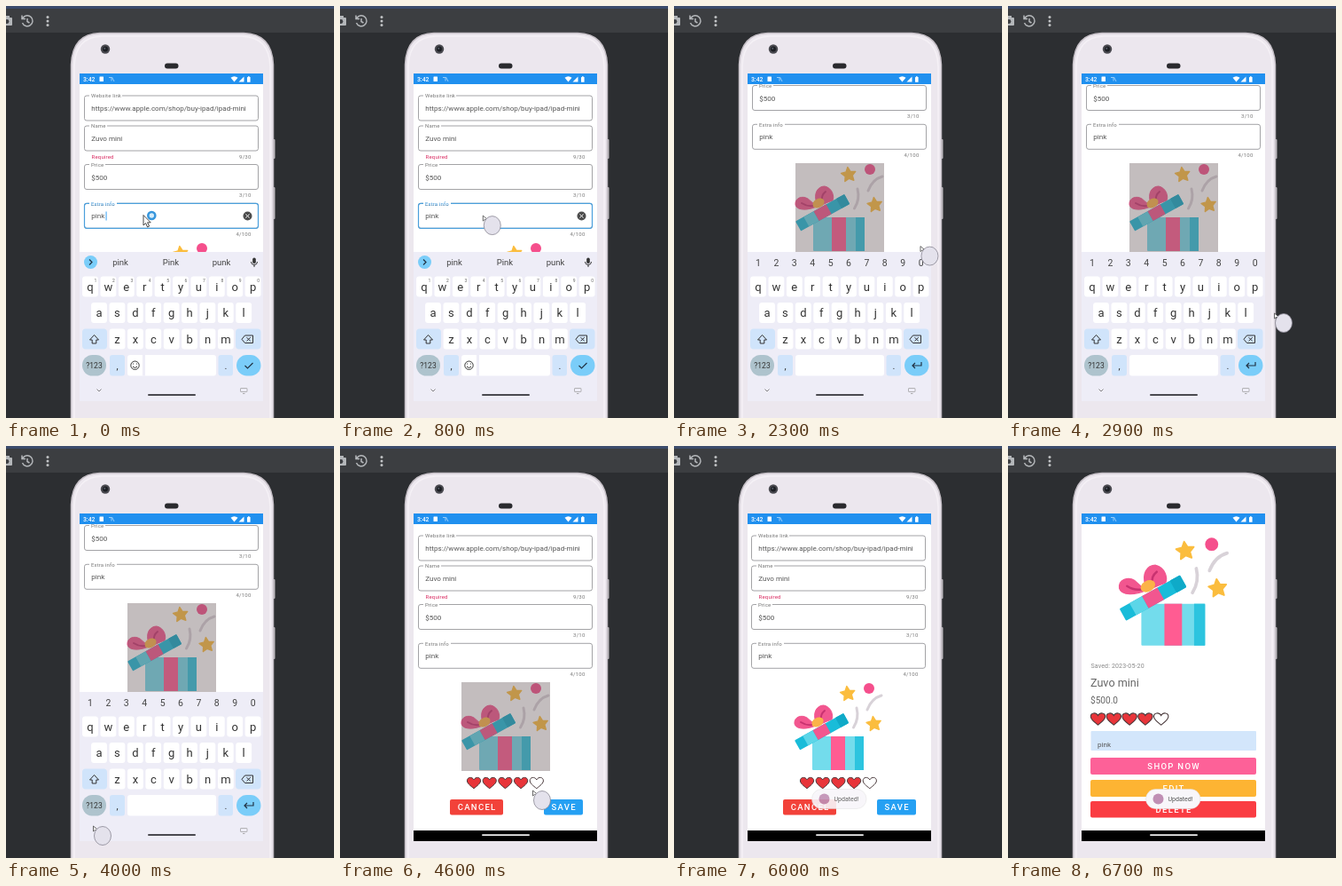
Animation of 370x464 px, one loop 7.2 s. Source, as an HTML page:

```html
<!DOCTYPE html>
<html lang="en">
<head>
<meta charset="utf-8">
<style>
html, body { margin: 0; width: 100%; height: 100%; overflow: hidden; background: #2c2e31; }
svg { display: block; width: 370px; height: 464px; font-family: Roboto, sans-serif; }
</style>
</head>
<body>
<svg id="stage" viewBox="0 0 370 464"></svg>
<script>
const W = 7200;
const rect = (x, y, w, h, fill, r = 0, extra = '') =>
  `<rect x="${x}" y="${y}" width="${w}" height="${h}" rx="${r}" fill="${fill}" ${extra}/>`;
const text = (x, y, size, s, fill = '#555', extra = '') =>
  `<text x="${x}" y="${y}" font-size="${size}" fill="${fill}" ${extra}>${s}</text>`;
const path = (d, stroke, width = 1, fill = 'none', extra = '') =>
  `<path d="${d}" stroke="${stroke}" stroke-width="${width}" fill="${fill}" ${extra}/>`;
const circle = (x, y, r, fill, extra = '') =>
  `<circle cx="${x}" cy="${y}" r="${r}" fill="${fill}" ${extra}/>`;
const group = (id, body, extra = '') => `<g id="${id}" ${extra}>${body}</g>`;
const mid = 'text-anchor="middle"', end = 'text-anchor="end"';
const round = 'stroke-linecap="round" stroke-linejoin="round"';

function field(y, label, labelWidth, value, count, note = '') {
  return rect(88.5, y, 196, 28, 'none', 2.5, 'stroke="#8c8c90" stroke-width=".8"')
    + rect(94, y - 2, labelWidth, 4, '#fff')
    + text(96, y + 2.4, 6, label, '#777', 'letter-spacing=".15"')
    + text(96.3, y + 17, 8.06, value)
    + (count ? text(276.5, y + 36.5, 6, count, '#777', end + ' letter-spacing=".2"') : '')
    + text(96.5, y + 36.5, 6, note, '#d8285f', 'letter-spacing=".2"');
}

function star(x, y, r) {
  const points = Array.from({ length: 10 }, (_, i) => {
    const a = i * Math.PI / 5 - 1.7, d = i % 2 ? r * 0.5 : r;
    return (x + d * Math.cos(a)).toFixed(1) + ',' + (y + d * Math.sin(a)).toFixed(1);
  });
  return `<polygon points="${points.join(' ')}" fill="#fbbd3e" stroke="#fbbd3e" stroke-width="1.5" stroke-linejoin="round"/>`;
}

const gift =
  path('M66.5 51C71 44 72 37 70 29M82 31C85 23 91 17 98 15', '#d8d2d8', 3, 'none', round)
  + circle(84, 7, 6, '#f54f8c') + star(60, 13, 8.5) + star(89.5, 47, 8.5)
  + rect(20, 61, 58, 38, '#73dcec', 1) + rect(41, 61, 16, 38, '#ff5c92')
  + rect(68, 61, 10, 38, '#2cc4df')
  + path('M24 49C15 53 2 54 0 47C-1 39 8 36 14 40Z', '#f2568f', 1, '#f2568f', round)
  + path('M24 45C20 34 25 26 33 26C42 28 44 38 42 42Q36 44 30 47Z', '#f2568f', 1, '#f2568f', round)
  + path('M20 48Q13 49 7 45M30 42Q29 36 34 32', '#c83270', 2, 'none', round)
  + '<ellipse cx="26" cy="45" rx="7" ry="5" fill="#fbb348" transform="rotate(-29 26 45)"/>'
  + '<g transform="translate(30.5 55.5) rotate(-29)">'
  + rect(-31.5, -6, 63, 12.5, '#19bcd9', 1) + rect(-21, -6, 13, 12.5, '#5cd6e8')
  + rect(-8, -6, 16, 12.5, '#f2568f') + rect(21, -6, 10.5, 12.5, '#0faac8', 1) + '</g>';

function hearts(x, y, step, k) {
  let out = '';
  for (let i = 0; i < 5; i++)
    out += `<g transform="translate(${x + i * step} ${y}) scale(${k})">`
      + path('M0 6.2C-4 3-7.6.4-7.6-2.6C-7.6-6.8-2-7.4 0-3.6C2-7.4 7.6-6.8 7.6-2.6C7.6.4 4 3 0 6.2Z',
        '#4a3a3c', 1, i < 4 ? '#e8353a' : '#fff') + '</g>';
  return out;
}

const button = (x, y, w, h, fill, label, spacing = 1.3) =>
  rect(x, y, w, h, fill, 2)
  + text(x + w / 2 + spacing / 2, y + h / 2 + 3.5, 9.5, label, '#fff', `${mid} font-weight="500" letter-spacing="${spacing}"`);

const form = rect(83, 0, 207, 600, '#fff')
  + field(101, 'Website link', 37, 'https://www.apple.com/shop/buy-ipad/ipad-mini', '')
  + field(135, 'Name', 20, 'Zuvo mini', '9/30', 'Required')
  + field(178.5, 'Price', 18, '$500', '3/10')
  + field(222.3, 'Extra info', 31, 'pink', '4/100')
  + group('focus', rect(88.5, 222.3, 196, 28, 'none', 2.5, 'stroke="#4a9fdc" stroke-width="1.2"')
    + rect(94, 220, 31, 4, '#fff') + text(96, 224.7, 6, 'Extra info', '#3f96d8', 'letter-spacing=".15"')
    + rect(112.6, 231.5, .9, 10, '#2196f3', 0, 'id="caret"')
    + circle(272.5, 236.5, 5, '#4c4c4c') + path('M270.5 234.5l4 4m0-4l-4 4', '#fff'))
  + `<g transform="translate(137 266)">${gift}</g>`
  + rect(137, 266, 100, 100, '#6a5a5e', 0, 'id="dim"')
  + hearts(151, 379.5, 17.7, 1)
  + button(124, 398, 60, 17.5, '#f2423a', 'CANCEL') + button(230, 398, 44, 17.5, '#25a0f3', 'SAVE');

const detail = rect(83, 88, 207, 345, '#fff')
  + `<g transform="translate(125.6 102) scale(1.24)">${gift}</g>`
  + text(93.5, 250, 7, 'Saved: 2023-05-20', '#888', 'letter-spacing=".15"')
  + text(93, 271, 12.6, 'Zuvo mini', '#666') + text(93, 290.3, 10.1, '$500.0', '#666')
  + hearts(101.5, 307.5, 17.8, 1.08)
  + rect(93.5, 321, 186.5, 22, '#d3e6fb', 1) + text(101, 339, 8.06, 'pink')
  + button(93, 351, 187, 19, '#fd6198', 'SHOP NOW') + button(93, 376, 187, 19, '#fdb433', 'EDIT')
  + button(93, 400, 187, 18.5, '#fa3d43', 'DELETE');

function keyRow(letters, x, y, hints) {
  return [...letters].map((c, i) => {
    const cx = x + i * 20.4;
    return rect(cx - 8.9, y, 17.8, 23, '#fff', 3) + text(cx, y + 16, 13, c, '#333', mid)
      + (hints ? text(cx + 6, y + 6.5, 5, (i + 1) % 10, '#666', `${mid} class="typing"`) : '');
  }).join('');
}

const tint = '#d0e4fb', sky = '#7acdf9';
const keyboard = rect(83, 277, 207, 168, '#eeedf7')
  + group('suggest', circle(95.5, 288.5, 7.5, sky) + path('M94 285.5l3 3l-3 3', '#234', 1.2)
    + ['pink', 'Pink', 'punk'].map((w, i) => text(129 + i * 57, 292, 9.5, w, '#444', mid)).join('')
    + rect(278.2, 283.5, 3.6, 6.5, '#333', 1.8) + path('M276.5 288a3.5 3.5 0 0 0 7 0M280 291.5v2.5', '#333'), 'class="typing"')
  + [...'1234567890'].map((n, i) => text(95 + i * 20.4, 293, 10.5, n, '#444', mid + ' class="plain"')).join('')
  + keyRow('qwertyuiop', 95, 304.5, true) + keyRow('asdfghjkl', 105, 334) + keyRow('zxcvbnm', 125.5, 363.5)
  + rect(86, 363.5, 28, 23, tint, 4) + path('M99.5 370.5l-5 5.5h2.7v4h4.6v-4h2.7z', '#333')
  + rect(259, 363.5, 28.5, 23, tint, 4) + path('M269.5 371h9v8.5h-9l-3.5-4.2zM271.5 373.2l4.2 4.2m0-4.2l-4.2 4.2', '#333')
  + rect(86, 393, 27, 23.5, '#aec3cd', 11.5) + text(99.5, 408, 8.5, '?123', '#333', mid)
  + rect(117, 393, 17, 23.5, tint, 3) + text(125.5, 409, 11, ',', '#333', mid)
  + rect(137, 393, 100, 23.5, '#fff', 3)
  + group('emoji', rect(154, 393, 3, 23.5, '#eeedf7') + circle(145.5, 404.7, 4.7, 'none', 'stroke="#333"')
    + path('M143 406q2.5 3 5 0M143.5 402.5v1M147.5 402.5v1', '#333'), 'class="typing"')
  + rect(239.5, 393, 16.5, 23.5, tint, 3) + text(248, 409, 11, '.', '#333', mid)
  + rect(260, 393, 27.5, 23.5, sky, 11.7)
  + path('M269.5 405l3 3l6-6', '#234', 1.2, 'none', 'class="typing"')
  + path('M279 401v4h-10m3-3l-3 3l3 3', '#234', 1.2, 'none', 'class="plain"')
  + path('M102.5 431.5l2.5 2.5l2.5-2.5', '#777', .9)
  + rect(264.5, 430.5, 7.5, 4, 'none', .5, 'stroke="#999" stroke-width=".7"') + path('M267 436.5h2.5', '#999', .8)
  + rect(160, 437, 54, 2, '#4a4a50', 1);

document.getElementById('stage').innerHTML =
  '<clipPath id="page"><rect x="83" y="88" width="207" height="345"/></clipPath>'
  + '<clipPath id="screen"><rect x="83" y="76" width="207" height="369"/></clipPath>'
  + rect(0, 0, 370, 464, '#2c2e31') + rect(0, 0, 370, 30, '#3c3e41') + rect(0, 0, 370, 3, '#3c4c6c')
  + rect(-6, 13, 13, 9, '#b4b7ba', 1) + rect(-1, 11, 5, 3, '#b4b7ba') + circle(1, 17.5, 2.4, '#3c3e41')
  + path('M19 13.5A6 6 0 1 1 18.5 19M18 10.5v4h4M24 14v3.5l2.5 1.5', '#b4b7ba', 1.5)
  + [12.5, 17, 21.5].map(y => circle(47, y, 1.5, '#c0c2c4')).join('')
  + rect(300, 150, 3.5, 22, '#bdb8be', 1) + rect(300, 204, 3.5, 36, '#bdb8be', 1)
  + path('M73.5 470V66Q75 31 106 30.5H268Q300 31 301.5 66V470Z', '#c4bec5', 1.5, '#ece7ee')
  + path('M77 470V68Q78 35 108 34H266Q297 35 298 68V470', '#f5f1f6', 1.5)
  + circle(112, 48.5, 5.2, '#4a4a50') + circle(112, 48.5, 3, '#1d1f24') + circle(111.3, 47.8, 1, '#59606c')
  + rect(179, 64.5, 15.5, 6, '#2a2a2e', 3)
  + rect(83, 76, 207, 369, '#fff') + rect(83, 76, 207, 12.5, '#2090ef')
  + text(87, 85, 6.8, '3:42', '#fff', 'font-weight="500"')
  + rect(105.5, 79.5, 4.5, 5.5, '#fff', .5) + path('M116 80.5h3v4M119.5 80l2.5 5', '#a5d3fa', .9)
  + path('M253.5 80.8q4-3 8 0l-4 4.6z', 'none', 0, '#fff') + path('M268.5 79.5v6h-6z', 'none', 0, '#fff')
  + rect(272, 80, 3.6, 5.8, '#fff', .5) + rect(273, 79.2, 1.6, 1, '#fff')
  + `<g clip-path="url(#page)">${group('form', form)}${group('detail', detail)}</g>`
  + rect(83, 433, 207, 12, '#000') + rect(160, 437.2, 54, 1.8, '#eee', 1)
  + `<g clip-path="url(#screen)">${group('keyboard', keyboard)}</g>`
  + group('toast', rect(155.5, 386.5, 61.5, 22, '#f8f6fa', 11, 'stroke="#ddd" stroke-width=".5"')
    + circle(169.5, 397.5, 6, '#c08fb4') + text(180.5, 400.2, 7, 'Updated!', '#555'))
  + group('arrow', path('M155 235.5v11.5l2.6-2.4l2 4.4l2-1l-2-4.2h3.6z', '#333', .9, '#fff')
    + circle(164.3, 236, 4, '#d5ecfa', 'stroke="#3796dc" stroke-width="2.6"'))
  + group('pointer', path('M-10.5-11v6l2-1.5l3-.3z', '#444', .8, '#fff')
    + '<ellipse rx="9.5" ry="10.5" fill="#e4e2ec" stroke="#8a8794" stroke-width=".8"/>');

const $ = id => document.getElementById(id);
const clamp = v => Math.max(0, Math.min(1, v));
const ease = (t, a, b) => { const p = clamp((t - a) / (b - a)); return p * p * (3 - 2 * p); };
const show = (node, alpha) => node.setAttribute('opacity', +alpha);

// time, x, y
const route = [
  [700, 168, 246], [1400, 236, 266], [1500, 236, 266], [2000, 237, 182], [2400, 298, 300],
  [2800, 311, 357], [2900, 311, 357], [3200, 284, 385], [3900, 109, 439], [4200, 109, 439],
  [4600, 228, 399], [4800, 250, 407], [5100, 250, 407], [5500, 319, 412]
];

function pointerAt(t) {
  const i = route.findIndex(p => p[0] > t);
  if (i < 1) return route[i ? route.length - 1 : 0].slice(1);
  const [a, b] = [route[i - 1], route[i]], k = ease(t, a[0], b[0]);
  return [a[1] + (b[1] - a[1]) * k, a[2] + (b[2] - a[2]) * k];
}

function draw(now) {
  const t = Math.floor(now % W / 100) * 100;
  const typing = t < 1600;
  const scroll = 89 * (ease(t, 1500, 2000) - ease(t, 4000, 4400));
  $('form').setAttribute('transform', `translate(${t >= 5900 ? -1 : 0} ${-scroll})`);
  $('keyboard').setAttribute('transform', `translate(0 ${170 * ease(t, 4000, 4400)})`);
  document.querySelectorAll('.typing').forEach(n => show(n, typing));
  document.querySelectorAll('.plain').forEach(n => show(n, !typing));
  show($('focus'), typing);
  show($('caret'), t % 1000 < 500);
  show($('dim'), .4 * (ease(t, 1500, 1800) - ease(t, 4900, 5200)));
  show($('detail'), ease(t, 6000, 6400));
  show($('toast'), .9 * ease(t, 5700, 6000) + .1 * ease(t, 6000, 6300));
  show($('arrow'), t < 700);
  show($('pointer'), t >= 700 && t < 5700);
  $('pointer').setAttribute('transform', `translate(${pointerAt(t).join(' ')})`);
  requestAnimationFrame(() => draw(performance.now()));
}
draw(0);
</script>
</body>
</html>
```
